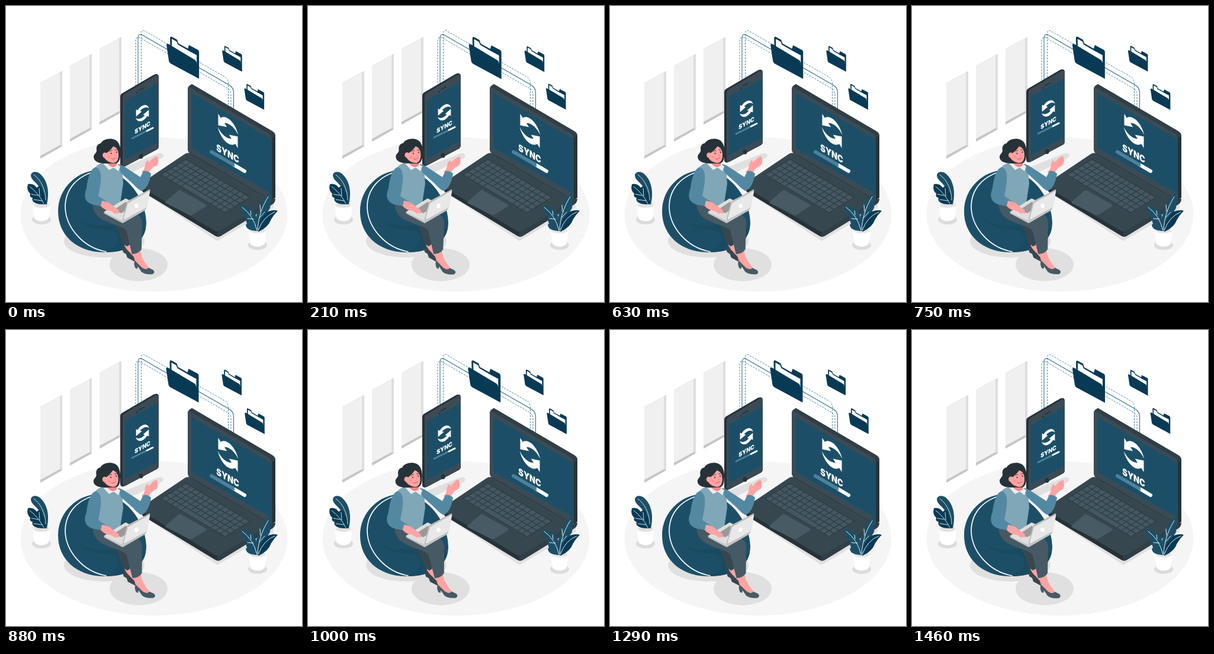
An HTML page with a canvas for the animation above (1500 ms loop, 500x500 px).

```html
<!DOCTYPE html>
<html lang="en">
<head>
<meta charset="utf-8">
<title>Sync</title>
<style>
html, body { margin: 0; width: 100%; height: 100%; overflow: hidden; background: #fff; }
canvas { display: block; width: 500px; height: 500px; }
</style>
</head>
<body>
<canvas id="stage" width="500" height="500"></canvas>
<script>
const LOOP = 1500;
const canvas = document.getElementById('stage');
const ctx = canvas.getContext('2d');
const ratio = window.devicePixelRatio || 1;
canvas.width = canvas.height = 500 * ratio;

const C = {
  floor: '#f5f5f5', shadow: '#e0e0e0', screen: '#1c4f67', navy: '#083a55',
  slate: '#455a64', bezel: '#3b4b55', dark: '#37474f', ink: '#263238',
  skin: '#ffa3a2', blush: '#f38787', sweater: '#80a7b7', sleeve: '#5388a3',
  bar: '#4d819b', vein: '#e4eef2', white: '#fff'
};

function fill(path, color) {
  ctx.fillStyle = color;
  ctx.fill(new Path2D(path));
}

function line(path, color, width = 1, dash = []) {
  ctx.strokeStyle = color;
  ctx.lineWidth = width;
  ctx.lineCap = dash.length ? 'butt' : 'round';
  ctx.lineJoin = 'round';
  ctx.setLineDash(dash);
  ctx.stroke(new Path2D(path));
  ctx.setLineDash([]);
}

function oval(x, y, rx, ry, color) {
  ctx.beginPath();
  ctx.ellipse(x, y, rx, ry, 0, 0, 2 * Math.PI);
  ctx.fillStyle = color;
  ctx.fill();
}

function place(matrix, draw) {
  ctx.save();
  ctx.transform(...matrix);
  draw();
  ctx.restore();
}

function swing(x, y, angle, draw) {
  ctx.save();
  ctx.translate(x, y);
  ctx.rotate(angle);
  ctx.translate(-x, -y);
  draw();
  ctx.restore();
}

function panels() {
  for (let i = 0; i < 3; i++) {
    place([1, 0, 0, 1, 50 * i, -28.7 * i], () => {
      fill('M58 130L95 110V237L58 258Z', '#c6c6c6');
      fill('M58 130L95 110V237L91 235L58 253Z', '#dedede');
      fill('M58 130L91 112.5V235L58 253Z', '#f0f0f0');
    });
  }
}

function cables() {
  const blue = '#4a86a3';
  line('M219 135V60Q219 50 227 54L374 139Q380 143 380 150V172', blue, 1, [3, 2]);
  line('M228.5 135V47Q228.5 39 235 42.5L370 120Q375.5 123 375.5 131V168', blue, 1, [3, 2]);
  line('M223 135V55Q223 45 231 49.5L377 133.5Q384.5 138 384.5 146V175', '#2f708f', 1.1);
}

function shadows() {
  fill('M190 276L257 249Q265 247 266 253Q265 256 261 258L207 284Z', C.shadow);
  fill('M226 311L357 397L452 341V322Z', C.shadow);
  oval(166, 397, 68, 28, C.shadow);
  oval(224, 437, 49, 28, C.shadow);
}

function syncIcon() {
  const arrow = 'M-19-18L-14-14C-5-23 13-22 20-3C13-11 3-14 -7-9L-2-5L-19 0Z';
  fill(arrow, C.white);
  ctx.save();
  ctx.rotate(Math.PI);
  fill(arrow, C.white);
  ctx.restore();
}

function syncText(size) {
  ctx.font = `900 ${size}px Inter, sans-serif`;
  ctx.textAlign = 'center';
  ctx.fillStyle = C.white;
  ctx.fillText('SYNC', 0, 0);
}

function phone() {
  fill('M193 153Q193 149 197 147L250 116Q258 113 258 120V237Q258 241 254 243L203 270Q193 275 193 267Z', C.ink);
  fill('M197 154Q197 150 201 148L252 118Q258 115 258 121V237Q258 240 254 242L204 269Q197 273 197 266Z', C.bezel);
  fill('M200.5 161L257 130V230L200.5 260Z', C.screen);
  line('M225 142.5L233 138', C.ink, 1.8);
  oval(221.5, 146.5, 1.4, 1.6, C.ink);
  oval(228, 254, 3.6, 4, C.ink);
  place([.57, -.3, 0, .65, 230.5, 181], syncIcon);
  place([.87, -.48, 0, 1, 230.5, 209], () => syncText(10.4));
  line('M213 223.5L248 206', C.bar, 2.8);
  line('M238 211L248 206', C.white, 2.8);
}

function keyboard() {
  const rows = 5, cols = 13;
  place([108 / cols, 64 / cols, -42 / rows, 26 / rows, 304, 259], () => {
    ctx.fillStyle = '#303f47';
    ctx.fillRect(-.1, -.1, cols + .2, rows + .2);
    ctx.fillStyle = '#455861';
    for (let r = 0; r < rows; r++) {
      for (let c = 0; c < cols; c++) {
        const space = r === rows - 1 && c > 3 && c < 9;
        ctx.fillRect(c + .08, r + .1, space ? 1 : .84, .82);
      }
    }
  });
}

function laptop() {
  fill('M230 300Q228 309 231 314L353 388Q357 391 362 389L450 335Q455 332 455 325L357 380Z', C.ink);
  fill('M357 381L453 325V332L361 389L357 390Z', '#303f47');
  fill('M232 297L302 250Q306 247 311 249L452 326L361 380Q357 382 353 380L232 308Q228 301 232 297Z', C.dark);
  keyboard();
  fill('M269 331L291 312Q293 310 296 312L337 335Q340 337 337 339L316 352Q313 354 310 353L270 333Z', '#485b65');
  fill('M307 140Q307 136 314 132L449 211Q455 214 455 220V324L448 328L312 250Q307 247 307 242Z', C.ink);
  fill('M307 140Q307 135 312 138L443 214Q449 218 449 225V328L312 249Q307 246 307 241Z', C.bezel);
  fill('M308 136L314 132L449 211Q455 214 455 220L449 223Q448 218 443 215L312 138Z', '#303f47');
  fill('M313.5 147L447 224Q448.5 225 448.5 228V317L313.5 240Z', C.screen);
  place([.87, .5, 0, 1.08, 375, 211], syncIcon);
  place([.87, .5, 0, 1.08, 374.5, 255], () => syncText(15));
  line('M347 246.5L403 279', C.bar, 6);
  line('M386 269L403 279', C.white, 6);
  fill('M382 263.5L386 266V272L382 269.5Z', C.bar);
}

function beanbag() {
  fill('M156 277C121 278 88 307 88 347C88 387 119 415 164 416C207 417 237 399 237 366C237 327 203 276 156 277Z', C.screen);
  fill('M121 358C133 372 164 372 184 369C211 371 232 382 236 374C234 401 202 417 164 416C190 407 198 391 181 380C158 377 136 378 121 358Z', '#1a4a61');
  line('M156 278C120 286 100 309 100 340C101 374 130 408 169 415', C.white, 1.7);
}

function legs(sway) {
  swing(220, 370, -.022 * sway, () => {
    fill('M199 400L211 398Q211 411 220 422L218 431Q208 425 203 416Z', C.skin);
    fill('M199 402Q196 410 198 416L203 419L205 425L216 431Q221 434 219 427L208 415Q203 411 199 402Z', C.dark);
    fill('M214 415L227 413Q228 426 240 440Q244 446 237 447Q225 444 218 431Z', C.skin);
    fill('M218 430Q215 436 219 443L222 444L223 440L229 449Q235 454 248 453Q253 450 249 446L241 442Q238 447 230 442Z', C.slate);
    fill('M166 347L203 351C212 351 210 374 210 397Q211 404 204 406L197 401L188 374Z', C.dark);
    fill('M190 352C213 345 229 350 230 366L229 411Q224 419 213 419L202 374Z', C.slate);
  });
  fill('M146 331C146 344 152 357 168 363C180 370 193 370 202 378C215 390 229 384 230 368C231 353 218 350 204 346L184 326Z', C.slate);
}

function torso() {
  fill('M153 270Q163 263 169 266L190 267C197 270 197 286 198 300L193 333Q176 348 146 332C151 314 142 286 153 270Z', C.sweater);
  fill('M189 267Q196 268 204 274L227 289L232 279Q238 277 245 283C243 298 236 312 228 312Q222 309 214 300L194 282Z', C.sleeve);
  fill('M164 266L169 262L187 266L193 271L190 279L182 273L174 277Z', '#ececec');
  fill('M168 257L188 258L187 269Q180 277 170 265Z', C.blush);
}

function hand(sway) {
  swing(234, 281, .04 * sway, () => {
    fill('M229 280Q235 276 235 267Q236 262 240 260L241 264L248 257Q253 253 256 254L257 262Q257 269 251 271Q242 276 240 286Q234 287 229 280Z', C.skin);
    line('M248 263L255 257M249 267L255 261', C.blush, .7);
  });
}

function head(nod) {
  swing(176, 270, .025 * nod, () => {
    fill('M160 232C163 225 176 222 184 226C191 229 195 240 193 252C193 260 190 266 184 266L168 266C158 266 148 263 148 255C148 250 153 249 153 244C152 238 154 233 160 232Z', C.ink);
    fill('M165 251C172 248 177 243 181 237C188 239 190 245 190 252C190 261 186 266 180 265C173 264 168 260 166 256Z', C.skin);
    oval(167, 252, 4, 4.5, C.skin);
    oval(177.5, 249, .9, 1.3, C.ink);
    oval(186.5, 247, .9, 1.3, C.ink);
    line('M175 246Q176 244 179 244M184 243L187 243', C.ink, .9);
    line('M183 249L185 253L182 254', C.blush, .8);
    line('M178 258Q182 260 186 256', '#ad4d58', .9);
    oval(174, 255, 2.5, 2, '#fa9292');
  });
}

function notebook() {
  fill('M165 350L203 326L237 344L197 367Z', '#c5c5c5');
  fill('M165 348L202 325L236 341L197 363Z', '#dedede');
  fill('M181 345L202 331L214 337L195 350Z', '#999');
  fill('M152 272C143 274 138 290 136 308C130 322 134 333 149 336L166 339L171 331L156 321C160 301 165 277 152 272Z', C.sleeve);
  fill('M162 329Q174 330 181 338L191 345Q191 350 186 350L176 346Q166 345 160 338Z', C.skin);
  line('M182 345L190 350M178 345L184 350', C.skin, 2);
  fill('M204 332Q205 330 208 328L242 310Q244 309 243 313L238 339Q238 342 235 343L199 362Q196 363 197 359Z', '#bdbdbd');
  fill('M206 333L241 313Q243 311 243 314L238 340L201 360Q198 361 199 358Z', '#e8e8e8');
  oval(220.5, 337.5, 3.3, 3.8, C.white);
}

function pot(x, y) {
  oval(x, y + 25, 16, 8, '#dcdcdc');
  fill(`M${x - 15} ${y}H${x + 15}L${x + 12} ${y + 23}Q${x} ${y + 32} ${x - 12} ${y + 23}Z`, C.white);
  oval(x, y, 15, 5.8, '#f0f0f0');
  oval(x, y, 12, 4, C.shadow);
}

function leftPlant() {
  pot(60, 336);
  fill('M69 335C74 315 70 296 60 286C53 278 43 279 42 286C42 294 52 298 56 306C61 315 63 325 64 335Z', C.screen);
  fill('M66 335C50 336 42 330 45 324Q39 323 41 317Q34 311 37 301Q46 299 52 307Q57 301 61 308Q60 314 66 317Q71 326 66 335Z', C.navy);
  line('M47 285C60 294 67 312 67 328M40 305Q55 316 64 334M43 318Q49 319 54 320M56 308L57 321M47 327L61 329', C.vein, .9);
}

function rightPlant() {
  pot(425, 379);
  fill('M423 379C418 360 426 343 435 325Q442 318 447 314Q448 325 446 331Q448 341 443 346C440 362 432 371 428 380Z', C.screen);
  fill('M423 380C404 375 408 365 402 352L394 337Q409 336 415 344Q423 350 423 360Q429 370 427 380Z', C.screen);
  fill('M425 380C426 363 438 348 446 346Q454 344 459 346Q452 353 448 360Q443 374 427 381Z', C.navy);
  fill('M423 380Q405 379 405 369Q416 363 424 379Z', C.screen);
  line('M443 322C431 341 426 360 425 378M399 340Q418 354 424 379M454 348Q435 355 426 379M430 347L429 336M428 358L437 348M414 353L413 346M418 360L408 359', C.vein, 1);
}

function folder(x, y, scale, drift) {
  place([scale, 0, 0, scale, x + .8 * drift, y + .6 * drift], () => {
    fill('M6 3Q6 0 9 1L18 6L20 12L36 21L38 15L53 23Q55 24 55 27V71L7 46Z', C.navy);
    fill('M9 4.5L17 9L19 14L37 24.5L51 32V60L9 34Z', C.white);
    fill('M0 15Q0 12 3 13L48 40Q50 41 51 45L55 72L7 46Q5 45 4 42Z', C.navy);
  });
}

function draw(time) {
  const phase = 2 * Math.PI * time / LOOP;
  const sway = Math.cos(phase - 1.4);
  const rise = -4 * (1 - Math.cos(phase));

  ctx.setTransform(ratio, 0, 0, ratio, 0, 0);
  ctx.fillStyle = C.white;
  ctx.fillRect(0, 0, 500, 500);
  oval(250, 352, 225.5, 130.5, C.floor);
  panels();
  cables();
  shadows();
  place([1, 0, 0, 1, 0, rise], phone);
  laptop();
  beanbag();
  legs(-sway);
  hand(sway);
  torso();
  head(sway);
  notebook();
  leftPlant();
  rightPlant();
  folder(271, 51, 1, sway);
  folder(365, 67, .61, sway);
  folder(402.7, 131.5, .61, -sway);
}

function tick(now) {
  draw(now % LOOP);
  requestAnimationFrame(tick);
}
draw(0);
requestAnimationFrame(tick);
</script>
</body>
</html>
```
